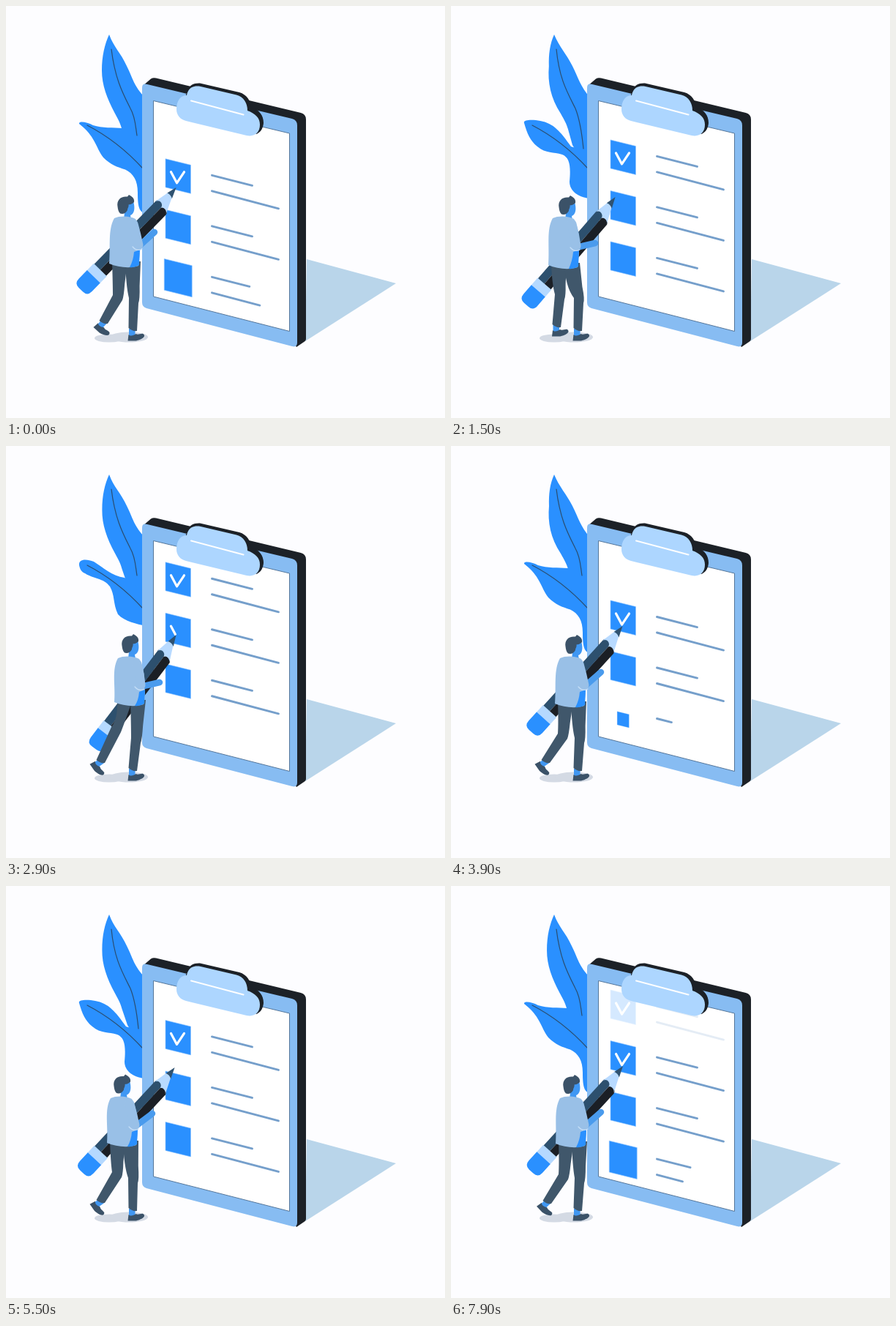
Animation, 600 px wide and 563 px high, one loop 8000 ms. Source, as an HTML page:

```html
<!DOCTYPE html>
<html lang="en">
<head>
<meta charset="utf-8">
<title>Checklist</title>
<style>
  html, body { margin: 0; width: 100%; height: 100%; overflow: hidden; background: #fdfdff; }
  svg { display: block; width: 100%; height: 100%; }
</style>
</head>
<body>
<svg viewBox="0 0 600 563">
  <defs>
    <clipPath id="paperClip"><path d="M202 130L387 174.500V444L202 397Z"/></clipPath>
    <path id="shoe" d="M-5 5C-2 8 2 6 5 4C8 6 12 3 15 4C20 8 12 12 5 13.500L-6 13.500Z" fill="#3b5268"/>
  </defs>

  <g fill="#2a90ff"><path id="leafTop"/><path id="leafSide"/></g>
  <g fill="none" stroke="#2b4d70" stroke-width="1.2" stroke-linecap="round">
    <path id="veinTop"/>
    <path d="M111 163C140 178 165 198 187 222"/>
  </g>

  <path d="M411 346L533 379L409 458Z" fill="#b9d5ea"/>
  <path d="M187 109L198 99.500Q201 97.500 205 98.500L403 146Q410 148 410 155V455Q410 457 408 458.500L397 466Z" fill="#1c2127"/>
  <path d="M186 112Q186 105 193 107L391 154Q398 156 398 163V460Q398 467 391 465L192 413Q186 411 186 405Z" fill="#87bcf2"/>
  <path d="M201.500 129.500L387.500 174V444.500L201.500 397Z" fill="#fff" stroke="#55779b"/>
  <g id="rows" clip-path="url(#paperClip)"></g>

  <path d="M246 122C248 112 252 105 265 105.500L319 118C329 121 334 129 335 138C346 142 352 149 352 160C351 169 347 173 342 175L320 160Z" fill="#1c2127"/>
  <path d="M233 141C233 129 239 122 247 122C249 112 256 108 266 110L315 121.500C325 124 330 133 330 143C341 147 347 153 347 162C347 173 340 179 329 177L246 157C238 155 233 149 233 141Z" fill="#add6ff"/>
  <path d="M253 129.500L324.500 148.500" stroke="#fff" stroke-width="2" stroke-linecap="round"/>

  <g fill="#d4dae4"><ellipse cx="141" cy="454" rx="20" ry="5.500"/><ellipse cx="168" cy="452.500" rx="26" ry="7"/></g>

  <g id="pencil">
    <g transform="rotate(-1.400 190 0)">
      <path d="M32 -11.500H155V0H32Q28 -1 28 -6Q28 -11 32 -11.500Z" fill="#2d506e"/>
      <path d="M34 0H155V11.500H36Q31 10 31 5Q31 1 34 0Z" fill="#1b1f25"/>
      <path d="M12 -7.500L33 -11.500Q28 -9 29 -5Q30 -1 34 0Q31 2 32 6Q33 10 37 11.500L13 .5Z" fill="#b8daff"/>
      <path d="M0 -4.600L14 -8Q12 -3 15 2Z" fill="#2f5270"/>
      <path d="M153 -12.500H167V12.500H153Z" fill="#b5d9ff"/>
      <path d="M166 -12.500H182Q191 -12.500 191 -4V4Q191 12.500 182 12.500H166Z" fill="#2a90ff"/>
    </g>
  </g>

  <g id="footL"><path d="M-4.500 -3H4V8H-4.500Z" fill="#4197f1"/><use href="#shoe"/></g>
  <g id="footR"><path d="M-4.500 -3H4V8H-4.500Z" fill="#4197f1"/><use href="#shoe"/></g>
  <path id="legL" fill="#40576b"/>
  <path id="legR" fill="#40576b"/>

  <g id="head">
    <path d="M163 275L167 269L174 267C176.500 275 176 284 170 286L171 292L161 291Z" fill="#3f97f3"/>
    <path d="M152.500 274C151 265 157 259.500 166 260.500L168 258C171 260 176 262 175 268C172 271 170 271 167.500 271.500C168 275 166 276 166 279C164 283 160 285 156 283.500C153.500 281 153 278 152.500 274Z" fill="#3b5268"/>
  </g>
  <path id="torso" fill="#99c0e7"/>
  <path id="lining" fill="#2a90ff"/>
  <path id="forearm" fill="none" stroke="#4a9bed" stroke-width="8.500" stroke-linecap="round"/>
  <path id="sleeve" fill="none" stroke="#99c0e7" stroke-width="13" stroke-linecap="round"/>
  <path id="cuff" fill="none" stroke="#c5def7" stroke-width="1.200" stroke-linecap="round"/>
</svg>
<script>
const $ = id => document.getElementById(id);
const DURATION = 8000, SCROLL = 4030, SWAY = 4000, ROW_GAP = 69.5;
const clamp = x => Math.min(1, Math.max(0, x));
const ramp = (t, from, to) => clamp((t - from) / (to - from));
const smooth = x => x * x * (3 - 2 * x);
const easeOut = x => 1 - (1 - x) * (1 - x);
const lerp = (a, b, k) => a + (b - a) * k;
const setPath = (id, d) => $(id).setAttribute('d', d);

// Blends two paths that share the same commands.
function mixPath(a, b, k) {
  const target = b.match(/[\d.]+/g);
  let i = 0;
  return a.replace(/[\d.]+/g, n => lerp(+n, +target[i++], k).toFixed(2));
}

// Finds the two keys around t; every key starts with its time.
function between(keys, t) {
  let i = 0;
  while (i < keys.length - 2 && t >= keys[i + 1][0]) i++;
  return [keys[i], keys[i + 1], smooth(ramp(t, keys[i][0], keys[i + 1][0]))];
}

/* Plant */
const topNarrow = 'M141 39C135 52 133.5 66 134 82C132 104 136 126 150 147C155 156 158 161 160 168L166 190L190 230L190 125C177 110 174 98 166 82C158 66 148 56 141 39Z';
const topWide = 'M141 39C135 52 131 68 131 88C131 108 138 126 149 147C154 156 156 160 158 167L166 190L190 230L190 125C175 110 173 98 165 82C157 64 147 56 141 39Z';
const side = [
  'M100 161C99 157 110 158 119 163C132 167 146 166 160 167L190 200L190 283C181 282 180 270 180 255C180 238 174 229 163 223.5C152 220 143 217 133 207C122 192 122 178 100 161Z',
  'M100 160C98 155 112 155 122 157C140 160 150 172 164 192L190 200L190 263C176 262 162 254 162 240C164 218 162 207 152 203C140 199 130 202 118 192C108 184 104 174 100 160Z',
  'M100 163C99 154 110 154 120 158C133 166 145 178 162 180L190 200L190 246C180 243 162 240 153 230C146 215 149 204 142 192C133 180 120 182 108 174C103 172 101 168 100 163Z'
];
const veinShort = 'M144 59C149 100 160 120 170 140C177 152 177 165 179 177';
const veinLong = 'M144 59C148 100 159 118 170 140C176 155 179 175 181 195';
const plantKeys = [
  [0, side[0], veinShort], [1500, side[1], veinLong],
  [2900, side[2], veinShort], [3900, side[0], veinShort], [4000, side[0], veinShort]
];

function drawPlant(t) {
  const [a, b, k] = between(plantKeys, t % SWAY);
  setPath('leafSide', mixPath(a[1], b[1], k));
  setPath('veinTop', mixPath(a[2], b[2], k));
  setPath('leafTop', mixPath(topWide, topNarrow, (1 - Math.cos(t * 2 * Math.PI / 2600)) / 2));
}

/* List rows */
const never = 1e6;
const rows = [
  { born: -9000, tick: -1000, fade: 3430 },
  { born: -4250, tick: 2800, fade: 7580 },
  { born: -500, tick: 7050, fade: never },
  { born: 3750, tick: never, fade: never },
  { born: 7500, tick: never, fade: never }
];
for (const row of rows) {
  $('rows').insertAdjacentHTML('beforeend', `<g>
    <path d="M218 -22.500L252.500 -14V25L218 16.500Z" fill="#2a90ff" stroke="#8fc4ff" stroke-width=".6"/>
    <path d="M225.500 -4.500L233.500 10.500L243.500 -4.500" pathLength="1" fill="none" stroke="#fff" stroke-width="3.200" stroke-linecap="round" stroke-linejoin="round"/>
    <path fill="none" stroke="#759fcb" stroke-width="2.900" stroke-linecap="round"/>
    <path fill="none" stroke="#759fcb" stroke-width="2.900" stroke-linecap="round"/></g>`);
  row.group = $('rows').lastElementChild;
  [row.box, row.check, row.line1, row.line2] = row.group.children;
}

function drawLine(el, y, length, slope, p) {
  el.style.display = p > 0 ? '' : 'none';
  el.setAttribute('d', `M281.500 ${y}l${length * p} ${length * slope * p}`);
}

function drawRow(row, index, t) {
  const age = t - row.born;
  const y = 231.3 + ROW_GAP * (index - t / SCROLL);
  const scale = age < 400 ? 1.1 * smooth(ramp(age, 0, 335)) : lerp(1.1, 1, smooth(ramp(age, 500, 800)));
  const tick = ramp(t, row.tick, row.tick + 280);
  row.group.style.display = age > 0 ? '' : 'none';
  row.group.setAttribute('transform', `translate(0 ${y})`);
  row.group.setAttribute('opacity', 1 - ramp(t, row.fade, row.fade + 400));
  row.box.setAttribute('transform', `translate(235.200 1.300) scale(${scale}) translate(-235.200 -1.300)`);
  row.check.style.display = tick > 0 ? '' : 'none';
  row.check.setAttribute('stroke-dasharray', tick < 1 ? `${tick} 2` : 'none');
  drawLine(row.line1, 0, 55, .255, easeOut(ramp(age, 20, 670)));
  drawLine(row.line2, 21.5, 91, .264, smooth(ramp(age, 215, 655)));
}

/* Man: head, back, waist x, waist dy, left knee, left ankle, foot turn,
   right knee x, hand, elbow, pencil tip, pencil end */
const finish = [163, 146, 141, 0, 152, 397, 133, 433, 42, 174, 203, 309, 181, 329, 232.5, 248, 103, 387];
const rest =   [158, 137, 133, 2, 148, 396, 144, 438, 0, 174, 197, 324, 171, 330, 224.5, 261, 104, 407];
const write =  [169, 151, 148, -2, 150, 386, 129, 432, 55, 177, 210, 323, 184, 329, 232.5, 258, 121, 412];
const stroke = [171, 151, 147, -1, 151, 389, 129, 432, 55, 177, 214, 314, 185, 329, 243, 244, 122, 394];
const hold =   [164, 147, 143, 0, 153, 396, 131, 433, 47, 175, 205, 309, 182, 329, 235, 246, 109, 391];
const lean =   [167, 147, 142, 0, 152, 395, 129, 432, 55, 175, 205, 309, 182, 329, 234.5, 246, 109, 391];
const back =   [158, 141, 138, -1, 151, 393, 129, 432, 55, 173, 200, 311, 176, 329, 230.5, 248, 104, 391];
const reach =  [165, 149, 146, -1, 151, 390, 129, 432, 55, 176, 206, 319, 181, 329, 229.5, 253, 117, 408];
const manKeys = [
  [0, finish], [1250, back], [1500, rest], [2650, reach], [2900, write], [3090, stroke],
  [3650, hold], [3900, lean], [4250, finish], [5500, back], [5750, rest],
  [6900, reach], [7150, write], [7340, stroke], [7900, hold], [8150, lean]
];

// Tapered two-part limb through hip, knee and ankle.
function leg(id, hx, hy, kx, ky, ax, ay) {
  setPath(id, `M${hx - 10} ${hy - 6}Q${hx - 9} ${lerp(hy, ky, .6)} ${kx - 6} ${ky - 2}L${ax - 5.5} ${ay - 3}` +
    `Q${ax} ${ay + 2} ${ax + 6} ${ay + 1}L${kx + 7} ${ky + 5}Q${kx + 9} ${ky} ${lerp(kx, hx, .4) + 9} ${lerp(ky, hy, .4)}L${hx + 11} ${hy - 6}Z`);
}

function drawMan(t) {
  const [a, b, k] = between(manKeys, t);
  const [head, top, waist, drop, kneeX, kneeY, ankleX, ankleY, turn, kneeR, handX, handY,
    elbowX, elbowY, tipX, tipY, endX, endY] = a[1].map((v, i) => lerp(v, b[1][i], k));
  const angle = Math.atan2(endY - tipY, endX - tipX) * 180 / Math.PI;
  // Mirrored so that the blue face stays on the upper side.
  $('pencil').setAttribute('transform', `translate(${tipX} ${tipY}) rotate(${angle}) scale(1 -1)`);
  $('head').setAttribute('transform', `translate(${head - 163} ${drop / 2})`);
  $('footL').setAttribute('transform', `translate(${ankleX} ${ankleY}) rotate(${turn})`);
  $('footR').setAttribute('transform', 'translate(172.500 444)');

  const hem = 355 + drop;
  leg('legL', waist + 14, hem, kneeX, kneeY, ankleX, ankleY);
  leg('legR', waist + 32, hem, kneeR, 401, 173, 443);
  setPath('torso', `M${top + 2} 290C${top + 10} 286 ${top + 24} 287 ${top + 31} 291C${top + 38} 302 ${waist + 42} 322 ${waist + 42} 338` +
    `L${waist + 40} ${hem}C${waist + 28} ${hem + 4} ${waist + 12} ${hem + 2} ${waist} ${hem - 3}C${waist + 2} 328 ${top - 7} 306 ${top + 2} 290Z`);
  setPath('lining', `M${waist + 34} 336L${waist + 42} 333L${waist + 41} ${hem - 1}Q${waist + 35} ${hem + 3} ${waist + 28} ${hem + 2}Q${waist + 33} 348 ${waist + 34} 336Z`);
  setPath('forearm', `M${elbowX} ${elbowY}L${handX} ${handY}`);
  setPath('sleeve', `M${top + 28} 298Q${top + 32} 312 ${elbowX} ${elbowY - 2}`);
  setPath('cuff', `M${elbowX - 8} ${elbowY}Q${elbowX - 2} ${elbowY + 7} ${elbowX + 5} ${elbowY + 3}`);
}

function render(t) {
  drawPlant(t);
  rows.forEach((row, i) => drawRow(row, i, t));
  drawMan(t);
}

const start = performance.now();
function tick() {
  render((performance.now() - start) % DURATION);
  requestAnimationFrame(tick);
}
render(0);
requestAnimationFrame(tick);
</script>
</body>
</html>
```
